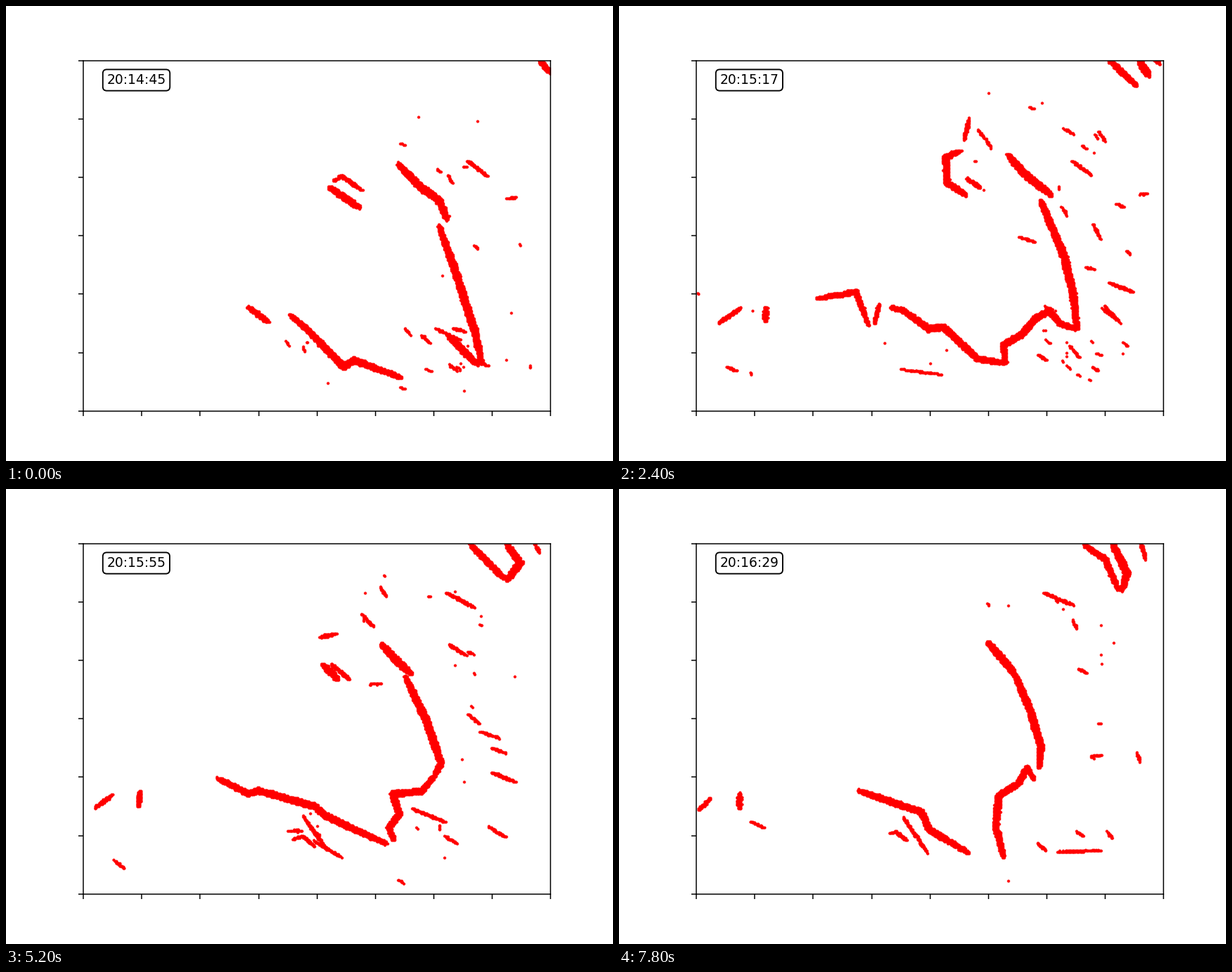
Animation of 864 by 648 pixels, one loop 8 s. Source, as a matplotlib script:

```python
import numpy as np
import matplotlib.pyplot as plt
from matplotlib.animation import FuncAnimation

FRAMES, INTERVAL = 40, 200
COLS, ROWS = 400, 300
CELL = 1.6632                        # stage pixels per grid cell
ORIGIN = np.array([110.16, 77.76])   # stage position of grid cell (0, 0)
DOT = 2.1                            # dot radius in pixels
STEP = 1.4
FADE = 3                             # frames a stroke outlives its first and last key
OFFSETS = np.array([(i, j) for i in range(-5, 6) for j in range(-5, 6)])

rng = np.random.default_rng(7)
strokes, echoes = [], []


def resample(pts, count):
    pts = np.asarray(pts, float)
    s = np.r_[0, np.cumsum(np.hypot(*np.diff(pts, axis=0).T))]
    u = np.linspace(0, s[-1], count)
    return np.column_stack([np.interp(u, s, pts[:, k]) for k in (0, 1)])


def with_width(pts, width):
    """Add a stroke width that narrows towards both ends."""
    u = np.linspace(0, 1, len(pts))
    profile = 0.6 + 0.4 * np.clip(4 * u * (1 - u), 0, 1) ** 0.4
    return np.column_stack([pts, width * profile])


def stroke(width, keys):
    """A line whose shape glides between a few key poses (frame: points)."""
    longest = max(np.hypot(*np.diff(p, axis=0).T).sum() for p in keys.values())
    count = int(longest / STEP) + 2
    strokes.append((width, {f: resample(p, count) for f, p in keys.items()}))


def cloud(visible, center, spread, first=0, last=FRAMES):
    """Random short streaks around a point; about `visible` show at a time."""
    life = 6
    for _ in range(int(visible * (last - first + life) / life)):
        x, y = rng.normal(center, spread)
        born = rng.uniform(first - life, last)
        length = max(rng.exponential(10) - 3, 0)
        angle = rng.normal(0.6, 0.35)
        u = np.linspace(-0.5, 0.5, int(length / STEP) + 1)[:, None]
        pts = [x, y] + u * length * np.array([np.cos(angle), np.sin(angle)])
        echoes.append((born, born + rng.uniform(3, 9), with_width(pts, 4 + min(length, 16) / 5)))


# upper arm and long wall
stroke(14, {0: [(558, 225), (588, 256), (616, 276), (628, 304)],
            12: [(553, 212), (578, 240), (615, 269)],
            26: [(534, 221), (556, 245), (576, 263)],
            33: [(533, 216), (558, 244), (575, 262)],
            39: [(525, 219), (549, 246), (563, 264)]})
stroke(14, {0: [(616, 312), (640, 380), (667, 463), (677, 510)],
            12: [(600, 277), (633, 355), (646, 410), (652, 460)],
            26: [(568, 267), (597, 327), (619, 390), (610, 408)],
            33: [(575, 262), (598, 320), (619, 386)],
            39: [(563, 264), (585, 315), (600, 365), (598, 396)]})

# hook, then the notch that joins coast and wall
stroke(13, {0: [(630, 470), (655, 495), (672, 511)]})
stroke(13, {6: [(560, 518), (570, 500), (562, 464), (588, 478), (598, 464), (630, 468), (662, 475)],
            12: [(550, 508), (547, 482), (572, 468), (593, 444), (612, 434), (628, 452), (652, 460)],
            21: [(558, 506), (573, 465), (567, 440), (600, 433), (624, 427)],
            26: [(552, 500), (545, 482), (559, 462), (550, 434), (592, 430), (610, 408)],
            33: [(555, 500), (551, 465), (558, 427), (588, 422), (591, 408), (619, 388)],
            39: [(547, 524), (536, 480), (540, 437), (568, 419), (580, 397), (591, 413)]})
stroke(23, {6: [(536, 470), (550, 488), (566, 500)]})

# lower coast and its western end
stroke(13, {0: [(404, 440), (428, 460), (480, 513), (495, 504), (562, 529)],
            6: [(430, 449), (445, 468), (490, 487), (540, 516), (565, 519)],
            12: [(387, 429), (404, 433), (440, 459), (462, 457), (510, 502), (550, 508)],
            21: [(357, 431), (397, 439), (450, 442), (485, 475), (520, 478), (557, 503)],
            26: [(301, 412), (346, 434), (358, 429), (440, 452), (455, 465), (541, 505)],
            33: [(313, 401), (345, 422), (396, 435), (440, 458), (498, 489), (511, 514)],
            39: [(340, 429), (386, 445), (430, 460), (442, 485), (497, 518)]})
stroke(11, {0: [(344, 428), (374, 451)],
            6: [(330, 416), (357, 425), (369, 456)],
            12: [(282, 416), (337, 407), (355, 455)],
            21: [(278, 410), (303, 406), (335, 420)]})
stroke(11, {6: [(217, 427), (216, 447)], 39: [(172, 433), (171, 455)]})
stroke(9, {6: [(151, 456), (162, 446)],
           12: [(141, 452), (174, 429)],
           39: [(113, 457), (130, 441)]})
stroke(9, {6: [(379, 430), (376, 453)], 12: [(370, 424), (363, 452)]})

# inner group
stroke(13, {0: [(460, 258), (503, 287)],
            6: [(468, 219), (462, 247), (501, 275)],
            12: [(486, 206), (465, 215), (467, 252), (494, 269)],
            21: [(451, 231), (493, 271)],
            26: [(451, 250), (472, 271)]})
stroke(9, {0: [(466, 249), (478, 242), (507, 263)],
           12: [(494, 245), (515, 259)],
           21: [(475, 237), (508, 266)],
           26: [(462, 249), (489, 271)]})
stroke(9, {6: [(494, 168), (492, 195)], 12: [(498, 160), (491, 191)]})
stroke(9, {21: [(467, 208), (488, 192)], 26: [(446, 211), (471, 206)]})
stroke(7, {6: [(512, 174), (533, 204)], 33: [(504, 179), (520, 194)]})

# top right corner
stroke(12, {0: [(760, 79), (775, 95)],
            12: [(698, 78), (737, 114)],
            21: [(684, 78), (740, 129)],
            26: [(660, 78), (703, 122), (713, 128)],
            33: [(673, 78), (725, 137)],
            39: [(661, 79), (692, 100), (710, 143)]})
stroke(14, {12: [(740, 78), (754, 99)],
            21: [(732, 78), (745, 121)],
            26: [(712, 78), (731, 105), (713, 129)],
            39: [(702, 78), (723, 120), (715, 144)]})
stroke(8, {12: [(763, 78), (770, 82)], 39: [(743, 78), (749, 101)]})

# eastern streaks and the spurs below the coast
stroke(8, {0: [(656, 220), (686, 243)], 26: [(630, 221), (655, 237)]})
stroke(8, {21: [(634, 147), (675, 170)], 39: [(604, 147), (648, 166)]})
stroke(8, {12: [(697, 394), (732, 407)], 26: [(691, 404), (725, 417)]})
stroke(8, {21: [(600, 447), (650, 475)], 26: [(578, 455), (625, 474)]})
stroke(8, {21: [(429, 464), (460, 507)], 39: [(404, 467), (440, 519)]})
stroke(8, {21: [(417, 502), (432, 496), (451, 512)], 39: [(385, 491), (394, 488), (409, 500)]})

cloud(13, (690, 270), (50, 75))
cloud(14, (650, 490), (38, 25), last=36)
cloud(6, (440, 495), (22, 16), last=30)
cloud(5, (525, 185), (50, 40), first=4, last=36)
cloud(2, (180, 480), (35, 50), first=4)
cloud(2, (562, 563), (14, 8), first=4, last=34)


def pose(keys, n):
    """Shape at frame n, or None while it is out of sight."""
    known = sorted(keys)
    if not known[0] - FADE <= n <= known[-1] + FADE:
        return None
    a = max([f for f in known if f <= n], default=known[0])
    b = min([f for f in known if f >= n], default=known[-1])
    u = (n - a) / (b - a) if b > a else 0
    return keys[a] * (1 - u) + keys[b] * u


def cells(pts, n):
    """Grid cells covered by the sampled lines, with slightly rough edges."""
    rough = np.random.default_rng(100 + n).uniform(-0.6, 0.6, (ROWS, COLS))
    center = (pts[:, :2] - ORIGIN) / CELL
    grid = np.rint(center).astype(int)[:, None] + OFFSETS
    gap = np.hypot(*np.moveaxis(grid - center[:, None], -1, 0)) * CELL
    width = pts[:, 2:]
    noise = rough[grid[..., 1] % ROWS, grid[..., 0] % COLS] * (width > 5)
    keep = (gap < width / 2 - DOT + noise) | ~OFFSETS.any(axis=1)
    return np.unique(grid[keep], axis=0)


def clock(n):
    s = 20 * 3600 + 14 * 60 + 45 + 2 * round(n * 4 / 3)
    return f"{s // 3600:02d}:{s // 60 % 60:02d}:{s % 60:02d}"


fig, ax = plt.subplots(figsize=(6.4, 4.8), dpi=135)
ax.set(xlim=(0, COLS), ylim=(ROWS, 0), aspect="equal",
       xticks=range(0, COLS + 1, 50), yticks=range(0, ROWS + 1, 50))
ax.tick_params(labelbottom=False, labelleft=False)
plot, = ax.plot([], [], "r.", ms=2.5)
label = ax.text(20, 20, "", fontsize=10, family="DejaVu Sans",
                bbox=dict(boxstyle="round", facecolor="white", edgecolor="black"))


def update(n):
    parts = []
    for width, keys in strokes:
        pts = pose(keys, n)
        if pts is not None:
            parts.append(with_width(pts, width))
    for born, gone, pts in echoes:
        if born <= n <= gone:
            parts.append(pts - np.array([1.2, 0.6, 0]) * (n - born))
    plot.set_data(*cells(np.vstack(parts), n).T)
    label.set_text(clock(n))
    return plot, label


anim = FuncAnimation(fig, update, frames=FRAMES, interval=INTERVAL,
                     init_func=lambda: update(0), repeat=True, repeat_delay=0)
plt.show()
```
